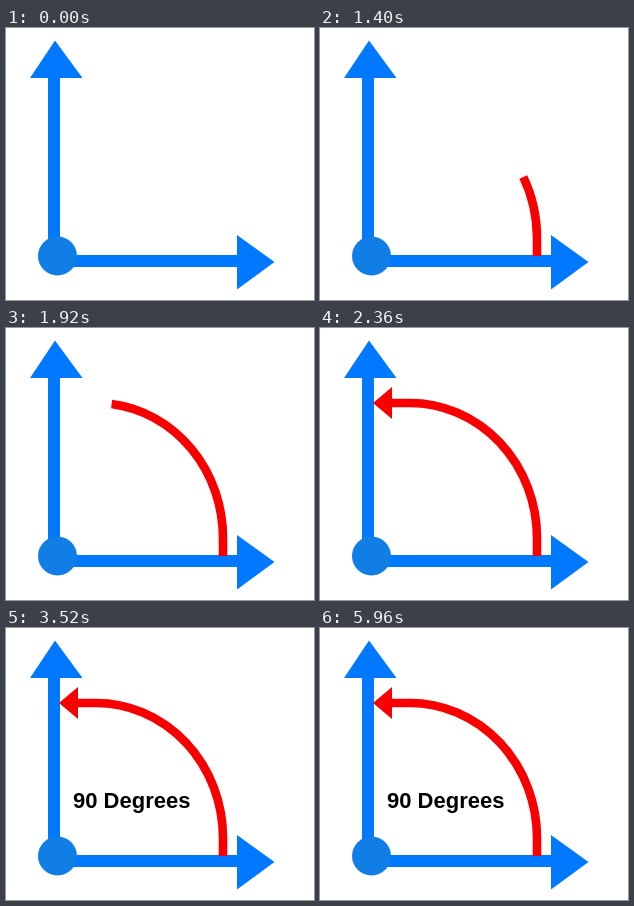
These frames come from a looping animation (308 px wide and 272 px high, 6040 ms). An HTML page:

```html
<!DOCTYPE html>
<html lang="en">
<head>
<meta charset="utf-8">
<title>90 degree angle</title>
<style>
  html, body { margin: 0; width: 100%; height: 100%; overflow: hidden; background: #fff; }
  svg { display: block; width: 308px; height: 272px; }
  text { font: bold 22px "Liberation Sans", Arial, sans-serif; }
</style>
</head>
<body>
<svg viewBox="0 0 308 272">
  <clipPath id="reveal"><rect id="window" width="308" height="272"/></clipPath>
  <g fill="#0078ff">
    <path d="M42 230V50H24L49 12.5L76.5 50H54V227H231V207L268.5 234L231 261.5V239H50Z"/>
    <circle cx="51.5" cy="228" r="19.5" fill="#117ee6"/>
  </g>
  <path id="arc" d="M217 228V210A127 135 0 0 0 90 75H71" fill="none" stroke="#f90000" stroke-width="8.6"/>
  <path d="M53 75L72 59V91Z" fill="#f90000" clip-path="url(#reveal)"/>
  <text id="label" x="67" y="180">90 Degrees</text>
</svg>
<script>
const LOOP = 6040, STEP = 40;
const ARC_LENGTH = 243, HEAD_BASE = 72;
// [time in ms, drawn length of arc plus arrowhead]
const growth = [[1160, 0], [1200, 21], [1600, 141], [1800, 179], [1920, 208], [2360, 262]];

const get = id => document.getElementById(id);
const arc = get("arc"), win = get("window"), label = get("label");
const clamp = v => Math.min(1, Math.max(0, v));

function drawnLength(t) {
  let length = 0;
  for (let i = 1; i < growth.length; i++) {
    const [t0, a] = growth[i - 1], [t1, b] = growth[i];
    length += (b - a) * clamp((t - t0) / (t1 - t0));
  }
  return length;
}

function render(t) {
  const length = drawnLength(t);
  arc.style.visibility = length ? "visible" : "hidden";
  arc.setAttribute("stroke-dasharray", `${length} 999`);
  win.setAttribute("x", HEAD_BASE - Math.max(0, length - ARC_LENGTH));
  win.style.visibility = length > ARC_LENGTH ? "visible" : "hidden";
  label.setAttribute("opacity", clamp((t - 2680) / 440));
}

const start = performance.now();
function tick() {
  const t = (performance.now() - start) % LOOP;
  render(Math.floor(t / STEP) * STEP);
  requestAnimationFrame(tick);
}
tick();
</script>
</body>
</html>
```
